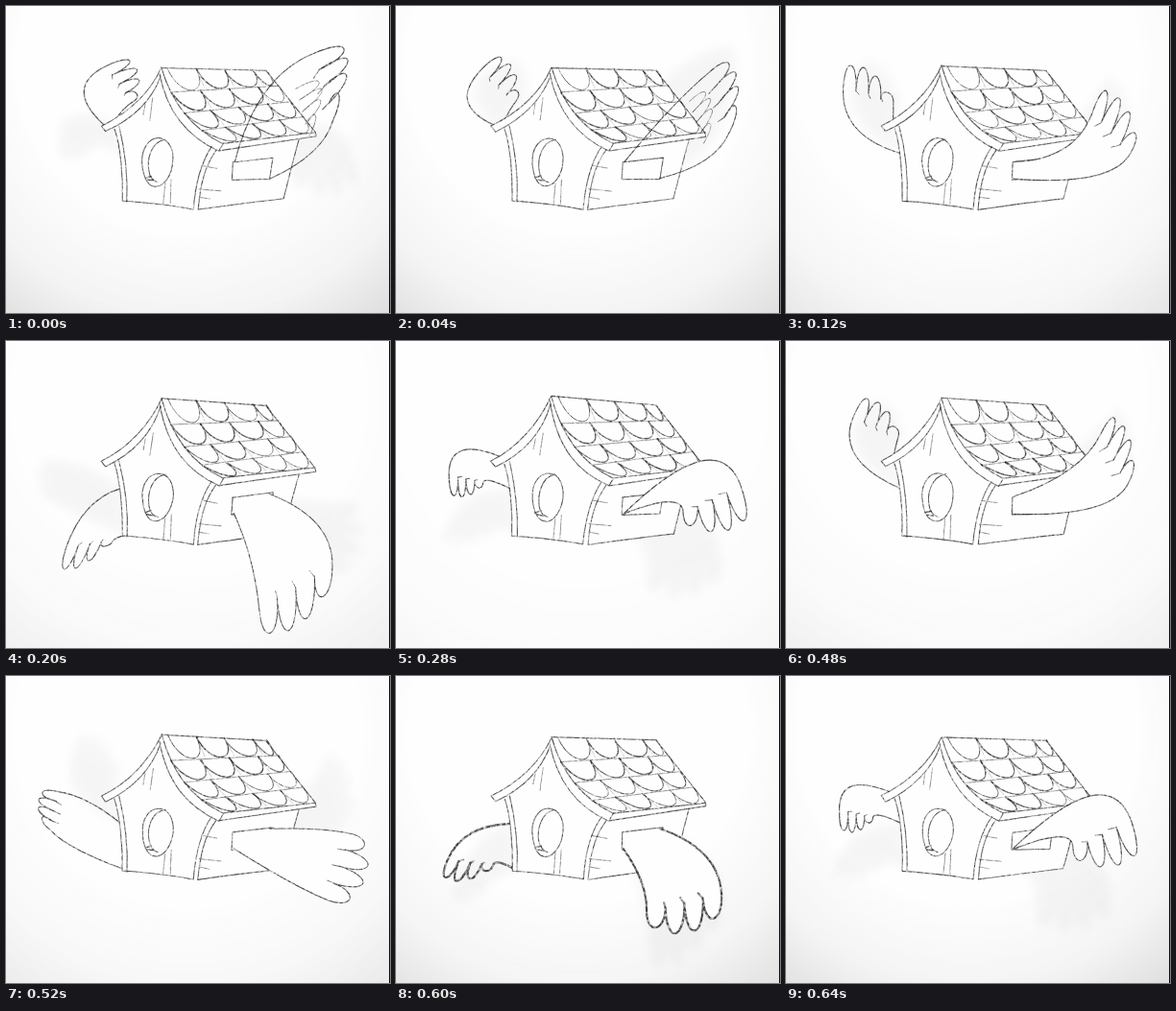
An HTML page for the animation above (680 ms loop, 400 px wide and 320 px high).

```html
<!DOCTYPE html>
<html lang="en">
<head>
<meta charset="utf-8">
<title>Winged birdhouse</title>
<style>
html, body { margin: 0; width: 100%; height: 100%; overflow: hidden; background: #fefefe; }
svg { display: block; width: 100vw; height: 100vh; }
path { stroke-linecap: round; stroke-linejoin: round; }
.ink { fill: none; stroke: #2c2c2c; filter: url(#pencil); }
.paper { fill: #fefefe; }
</style>
</head>
<body>
<svg viewBox="0 0 400 320" preserveAspectRatio="none">
  <defs>
    <filter id="pencil" filterUnits="userSpaceOnUse" x="0" y="0" width="400" height="320" color-interpolation-filters="sRGB">
      <feTurbulence id="tooth" type="fractalNoise" baseFrequency=".35" numOctaves="2"/>
      <feColorMatrix values="0 0 0 0 0  0 0 0 0 0  0 0 0 0 0  1.8 0 0 0 -.15"/>
      <feComposite in="SourceGraphic" operator="in"/>
    </filter>
    <filter id="smear" filterUnits="userSpaceOnUse" x="0" y="0" width="400" height="320">
      <feGaussianBlur stdDeviation="5"/>
    </filter>
    <radialGradient id="fall" gradientUnits="userSpaceOnUse" cx="190" cy="60" r="335">
      <stop offset=".52" stop-color="#fff" stop-opacity="0"/>
      <stop offset=".78" stop-color="#fff" stop-opacity=".3"/>
      <stop offset="1" stop-color="#fff"/>
    </radialGradient>
    <mask id="edge" maskUnits="userSpaceOnUse" x="0" y="0" width="400" height="320">
      <rect width="400" height="320" fill="url(#fall)"/>
    </mask>
  </defs>
  <rect class="paper" width="400" height="320"/>
  <rect id="shade" width="400" height="320" fill="#555" mask="url(#edge)"/>
  <path id="ghost" fill="#666" opacity=".05" filter="url(#smear)"/>
  <g class="ink" id="farInk"></g>
  <path class="paper" id="houseFill"/>
  <g class="ink" id="houseInk"></g>
  <path class="paper" id="nearFill"/>
  <g class="ink" id="nearInk"></g>
  <rect x="399" width="1" height="320" fill="#111"/>
</svg>
<script>
const STEP = 40, COUNT = 17;
const $ = id => document.getElementById(id);
const lerp = (a, b, t) => a + (b - a) * t;
const mix = (a, b, t) => a.map((v, i) => lerp(v, b[i], t));
const points = s => s.split(' ').map(p => p.split(',').map(Number));
const fix = p => p.map(v => v.toFixed(1)).join(' ');

// Each side: the pivot it swings about and the corners a wing can grow from
const sides = {
  near: { pivot: [238, 170], dir: 1, corners: points('238,162 275,159 275,180 237,180') },
  far: { pivot: [118, 140], dir: -1, corners: points('112,122 120,154 125,202 102,124') }
};

// Wing points: leading control, first tip, last tip, trailing control
const pose = (near, far, nearRoot, farRoot, weight = 1, solid = 1) =>
  ({ near: points(near), far: points(far), root: { near: nearRoot, far: farRoot }, weight, solid });

const raised = pose('262,72 352,45 347,93 330,155', '122,106 136,91 129,57 60,85', [0, 2], [0, 3], 1.1, 0);
const curled = pose('275,62 367,57 353,106 335,170', '120,108 135,93 126,72 50,88', [0, 2], [0, 3], 1.35, 0);
const spread = pose('302,160 334,89 364,133 335,188', '112,112 106,90 68,62 56,135', [0, 3], [0, 1]);
const low = pose('340,185 331,266 276,304 258,225', '80,165 61,238 103,214 114,205', [1, 3], [1, 2]);
const tucked = pose('335,180 331,253 271,262 262,215', '70,155 52,210 93,203 103,190', [1, 3], [1, 2], 2);
const rising = pose('335,85 363,187 308,192 300,155', '55,98 60,161 86,153 92,140', [3, 3], [0, 1], 1.1);

// Points turn about the pivot instead of sliding straight
function swing(a, b, t, { pivot: [x, y], dir }) {
  const polar = p => [Math.hypot(p[0] - x, p[1] - y), Math.atan2(p[1] - y, (p[0] - x) * dir)];
  const [r, angle] = mix(polar(a), polar(b), t);
  return [x + dir * r * Math.cos(angle), y + r * Math.sin(angle)];
}
function blend(a, b, t) {
  const side = k => a[k].map((p, i) => swing(p, b[k][i], t, sides[k]));
  return { ...(t < .5 ? a : b), near: side('near'), far: side('far'), weight: lerp(a.weight, b.weight, t) };
}

const keys = [
  [0, raised], [3, spread], [5, low], [6, tucked], [7, rising], [9, curled],
  [12, blend(curled, spread, .75)], [14, low], [15, tucked], [16, rising], [17, raised]
];
function poseAt(i) {
  const n = keys.findIndex(k => k[0] > i);
  const [s0, a] = keys[n - 1], [s1, b] = keys[n];
  return blend(a, b, (i - s0) / (s1 - s0));
}

let seed = 1;
const rand = () => (seed = seed * 16807 % 2147483647) / 2147483647;
const wobble = d => d.replace(/\d+(\.\d+)?/g, n => (+n + (rand() - .5) * .9).toFixed(1));
const stroke = (d, w = 1.1, o = .85) =>
  `<path d="${wobble(d)}" stroke-width="${w}" opacity="${o}"/>`;

function wing(p, side) {
  const [lead, first, last, trail] = p[side];
  const [r0, r1] = p.root[side].map(i => sides[side].corners[i]);
  const palm = mix(lead, trail, .5), mid = mix(first, last, .5);
  const reach = Math.hypot(mid[0] - palm[0], mid[1] - palm[1]);
  const bulge = .18 * Math.hypot(last[0] - first[0], last[1] - first[1]) / reach;
  const tips = [0, 1, 2, 3].map(i => {
    const k = bulge * Math.sin(Math.PI * i / 3);
    return mix(first, last, i / 3).map((v, j) => v + (mid[j] - palm[j]) * k);
  });
  const bases = [0, 1, 2, 3, 4].map(j =>
    mix(mix(first, last, (j - .5) / 3), mix(lead, trail, j / 4), .35));
  const outline = `M${fix(r0)}Q${fix(lead)} ${fix(bases[0])}` + fingers(bases, tips)
    + `Q${fix(trail)} ${fix(r1)}`;
  return { outline, bases, tips, root: mix(r0, r1, .5) };
}
function fingers(bases, tips) {
  return tips.map((t, i) => {
    const a = bases[i], b = bases[i + 1], m = mix(a, b, .5);
    const push = p => fix(p.map((v, k) => v + (t[k] - m[k]) * 1.33));
    return `C${push(a)} ${push(b)} ${fix(b)}`;
  }).join('');
}
function wingInk({ outline, bases, tips, root }, weight, coverts) {
  let s = stroke(outline, 1.1 * weight, .9);
  for (const b of bases.slice(1, 4)) s += stroke(`M${fix(b)}L${fix(mix(b, root, .08))}`, weight, .7);
  if (coverts) {
    const inner = bases.map(b => mix(b, root, .3));
    s += stroke(`M${fix(inner[0])}` + fingers(inner, tips.map(t => mix(t, root, .27))), 1, .6);
  }
  return s;
}

function roof(peak) {
  const left = v => [162 * (1 - v) ** 2 + 356 * v * (1 - v) + 226 * v * v,
    peak * (1 - v) ** 2 + 240 * v * (1 - v) + 143 * v * v];
  const at = (u, v) => mix(left(v), [271 + 51 * v, 67 + 65 * v], u);
  let s = '';
  for (let v = 0; v < 1; v += .25) {
    const edge = c => Math.max(0, Math.min(1, c * .27 - .04 + .1 * (1 - v) ** 3));
    if (v) s += stroke(`M${fix(at(0, v))}L${fix(at(1, v))}`, .9, .65);
    for (let c = 0; c < 4; c++) {
      const u0 = edge(c), u1 = edge(c + 1), a = at(u0, v), b = at(u1, v);
      s += stroke(`M${fix(a)}C${fix(at(u0, v + .32))} ${fix(at(u1, v + .32))} ${fix(b)}`, .9 + rand() * .6);
      if (c) s += stroke(`M${fix(a)}L${fix(at(u0, v + .22))}`, .7, .4);
    }
  }
  return s;
}

function house(peak) {
  const lines = [
    `M162 ${peak}C150 ${peak + 27} 126 112 99 125L104 131C130 119 151 99 161 ${peak + 9}`,
    `M162 ${peak}Q178 120 226 143L322 132`,
    `M160 ${peak + 6}C168 112 190 137 222 151L226 143`,
    `M162 ${peak}L271 67L322 132L323 136L222 151`,
    'M113 128C119 145 122 178 121 203C148 205 175 208 195 212C197 186 203 163 214 147',
    'M118 125C124 150 127 180 126 204',
    'M219 150C206 168 202 188 200 212C230 208 260 204 289 201C294 182 299 160 305 139',
    'M142 164C141 148 150 137 160 138C170 139 175 150 174 162C173 176 165 188 156 188C147 188 143 176 142 164',
    'M166 139C151 142 147 160 149 172C150 179 153 182 158 184',
    'M236 163L278 158L275 180L235 181L236 163'
  ];
  const grain = 'M153 96L150 119M145 102L143 113M172 181L171 206M166 185L164 206'
    + 'M204 166L220 169M201 191L224 193M201 199L212 201';
  return lines.map(d => stroke(d)).join('') + stroke(grain, .9, .65)
    + stroke('M145 179L151 177M147 181L153 182', 1.5) + roof(peak);
}

function draw(i) {
  seed = 977 * (i + 3);
  const p = poseAt(i), last = poseAt((i + COUNT - 1) % COUNT);
  const drift = Math.cos(2 * Math.PI * i / COUNT), peak = 60.5 + 4 * drift;
  const near = wing(p, 'near'), far = wing(p, 'far');
  $('tooth').setAttribute('seed', i + 1);
  $('shade').setAttribute('opacity', .11 + .08 * drift);
  $('ghost').setAttribute('d', wing(last, 'near').outline + 'Z' + wing(last, 'far').outline + 'Z');
  $('farInk').innerHTML = wingInk(far, p.weight);
  $('houseFill').setAttribute('d', `M162 ${peak}L271 67L323 136L305 140L289 201L200 213L121 203`
    + `Q122 160 113 128L104 131L99 125C126 112 150 ${peak + 27} 162 ${peak}Z`);
  $('houseInk').innerHTML = house(peak);
  $('nearFill').setAttribute('d', near.outline + 'Z');
  $('nearFill').setAttribute('opacity', p.solid);
  $('nearInk').innerHTML = wingInk(near, p.weight, !p.solid);
}

let shown = -1;
function tick(now) {
  const i = Math.floor(now / STEP) % COUNT;
  if (i !== shown) draw(shown = i);
  requestAnimationFrame(tick);
}
tick(0);
</script>
</body>
</html>
```
